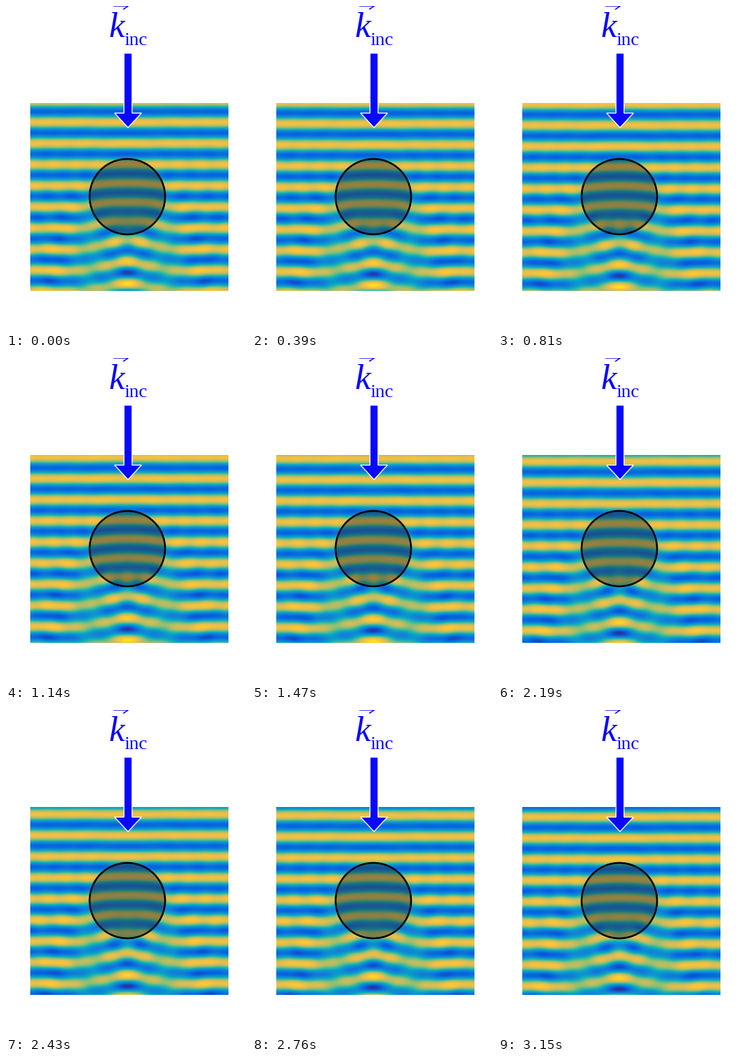
A matplotlib script that plays this animation: 356 px wide and 481 px high, repeating every 3.18 s.

```python
import numpy as np
import matplotlib.pyplot as plt
from matplotlib.animation import FuncAnimation
from matplotlib.colors import LinearSegmentedColormap
from matplotlib.patches import Circle, Polygon

W, H, DPI = 356, 481, 64
FRAMES, INTERVAL = 106, 30

# Field box, disc and wave, all in pixels
X0, X1, Y0, Y1 = 36, 330, 144, 423
CX, CY, R = 180, 283, 56
WAVELENGTH = 31.4
K = 2 * np.pi / WAVELENGTH
INDEX = 1.11 + 0.02j
CREST, SPEED = 172.5, 0.168
ORDERS = 25
BLUE = "#0808fb"

WAVE_COLORS = [
    (0.208, 0.166, 0.529), (0.012, 0.388, 0.882), (0.078, 0.504, 0.838),
    (0.023, 0.642, 0.791), (0.218, 0.725, 0.617), (0.571, 0.749, 0.449),
    (0.861, 0.735, 0.335), (0.996, 0.780, 0.200), (0.976, 0.983, 0.054),
]


def midpoints(end, count):
    step = end / count
    return (np.arange(count) + 0.5) * step, step


def bessel_j(n, x):
    t, dt = midpoints(np.pi, 300)
    x = np.atleast_1d(x)[:, None]
    return np.cos(n * t - x * np.sin(t)).sum(axis=1) * dt / np.pi


def bessel_y(n, x):
    x = np.atleast_1d(x)[:, None]
    t, dt = midpoints(np.pi, 1200)
    wave = np.sin(x * np.sin(t) - n * t).sum(axis=1) * dt
    s, ds = midpoints(5, 600)
    decay = np.exp(n * s - x * np.sinh(s))
    decay = decay + (-1) ** n * np.exp(-n * s - x * np.sinh(s))
    return (wave - decay.sum(axis=1) * ds) / np.pi


def hankel(n, x):
    return bessel_j(n, x) + 1j * bessel_y(n, x)


def slope(f, n, x):
    return (f(n - 1, x) - f(n + 1, x)) / 2 if n else -f(1, x)


def scattered_wave():
    """Complex field of a plane wave moving down through a round cylinder."""
    x, y = np.meshgrid(np.arange(X0, X1) + 0.5 - CX, np.arange(Y0, Y1) + 0.5 - CY)
    r, theta = np.hypot(x, y), np.arctan2(x, y)
    inside = r < R
    r_in, r_out = np.linspace(0, R, 150), np.linspace(R, r.max() + 1, 260)
    edge, edge_in = K * R, INDEX * K * R
    inner = np.zeros(r.shape, complex)
    outer = np.exp(1j * K * y)
    for n in range(ORDERS):
        j, dj = bessel_j(n, edge), slope(bessel_j, n, edge)
        h, dh = hankel(n, edge), slope(hankel, n, edge)
        jm, djm = bessel_j(n, edge_in), slope(bessel_j, n, edge_in)
        a = (INDEX * j * djm - dj * jm) / (dh * jm - INDEX * h * djm)
        c = (j + a * h) / jm
        angular = (2 if n else 1) * 1j ** n * np.cos(n * theta)
        outer += angular * np.interp(r, r_out, a * hankel(n, K * r_out))
        inner += angular * np.interp(r, r_in, c * bessel_j(n, INDEX * K * r_in))
    return np.where(inside, inner, outer)


def points(px):
    return px * 72 / DPI


field = scattered_wave()

fig = plt.figure(figsize=(W / DPI, H / DPI), dpi=DPI, facecolor="white")
ax = fig.add_axes([0, 0, 1, 1])
ax.set_xlim(0, W)
ax.set_ylim(H, 0)
ax.axis("off")

cmap = LinearSegmentedColormap.from_list("wave", WAVE_COLORS, N=256)
image = ax.imshow(field.real, cmap=cmap, vmin=-1.41, vmax=1.53,
                  extent=(X0, X1, Y1, Y0), interpolation="nearest", aspect="auto")
ax.set_xlim(0, W)
ax.set_ylim(H, 0)

ax.add_patch(Circle((CX, CY), R, facecolor=(0.15, 0.15, 0.15, 0.4), edgecolor="none"))
ax.add_patch(Circle((CX, CY), R, fill=False, edgecolor="black", linewidth=points(2.6)))

# Incoming direction
arrow = [(175, 70), (187, 70), (187, 159), (201, 159),
         (181, 180.5), (161, 159), (175, 159)]
ax.add_patch(Polygon(arrow, facecolor=BLUE, edgecolor="white",
                     linewidth=points(1.4), joinstyle="miter", zorder=4))

# Vector label
ax.text(152.5, 46, "k", color=BLUE, family="Liberation Serif", style="italic",
        size=points(53), va="baseline")
ax.text(175.5, 57.5, "inc", color=BLUE, family="Liberation Serif",
        size=points(28), va="baseline")
ax.plot([160, 180], [0.3, 0.3], color=BLUE, linewidth=points(1.6))
ax.plot([174.5, 181, 174.5], [-4, 0.3, 4.6], color=BLUE, linewidth=points(1.6))


def update(i):
    phase = K * (CREST + SPEED * i - CY)
    image.set_data((field * np.exp(-1j * phase)).real)
    return [image]


anim = FuncAnimation(fig, update, frames=FRAMES, interval=INTERVAL,
                     repeat=True, repeat_delay=0, blit=False)
plt.show()
```
